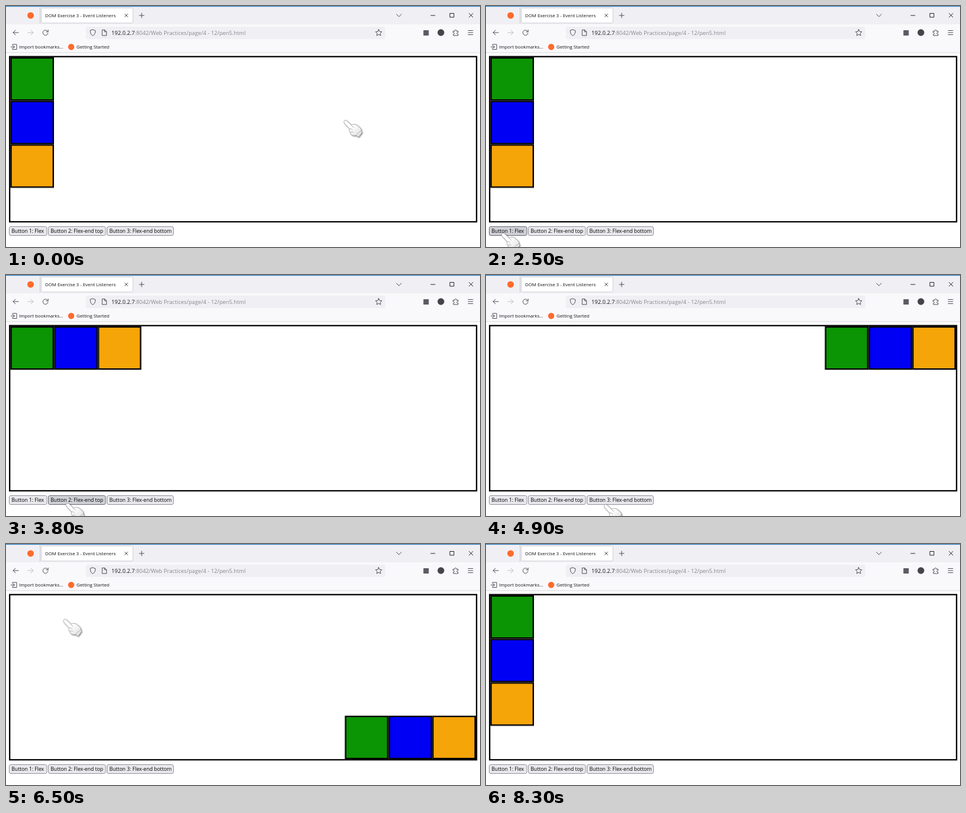
Animation of 800 by 408 pixels, one loop 8400 ms. Source, as an HTML page:

```html
<!DOCTYPE html>
<html lang="en">
<head>
<meta charset="utf-8">
<title>Event Listeners</title>
<style>
html, body { margin: 0; width: 100%; height: 100%; overflow: hidden; background: #fff; }
svg { display: block; width: 800px; height: 408px; }
text { font: 7.85px "Open Sans", "Noto Sans", sans-serif; fill: #15141a; white-space: pre; }
.url { font-size: 9.3px; fill: #85858d; }
.url .host { fill: #15141a; }
.button text { font-size: 8.6px; fill: #000; }
.button rect { fill: #e9e9ed; stroke: #8f8f9d; }
.icon { fill: none; stroke: #4c4b54; stroke-width: 1; stroke-linecap: round; stroke-linejoin: round; }

.box, .button rect, .reload, .burst, .cursor { animation: 8.4s infinite step-end; }

.box { --step: calc(var(--i) * 73.7px); stroke: #000; stroke-width: 2.4; animation-name: layout; }
@keyframes layout {
  0%, 82.1% { transform: translate(0, var(--step)); }
  34.5% { transform: translate(var(--step), 0); }
  49.4% { transform: translate(calc(564.6px + var(--step)), 0); }
  65.4% { transform: translate(calc(564.6px + var(--step)), 204px); }
  100% { transform: translate(0, var(--step)); }
}

.b1 rect { animation-name: hover1; }
.b2 rect { animation-name: hover2; }
.b3 rect { animation-name: hover3; }
@keyframes hover1 { 27%  { fill: #d0d0d7; stroke: #676774; } 40.5% { fill: #e9e9ed; stroke: #8f8f9d; } }
@keyframes hover2 { 43%  { fill: #d0d0d7; stroke: #676774; } 52.5% { fill: #e9e9ed; stroke: #8f8f9d; } }
@keyframes hover3 { 61%  { fill: #d0d0d7; stroke: #676774; } 73.2% { fill: #e9e9ed; stroke: #8f8f9d; } }

.reload { opacity: 0; animation-name: reload; }
@keyframes reload { 79% { opacity: 1; } 88% { opacity: 0; } }

.burst { opacity: 0; transform: scale(0); animation-name: burst; }
@keyframes burst {
  0% { opacity: 0; transform: scale(0); }
  82.1% { opacity: .42; transform: scale(0); animation-timing-function: linear; }
  86.6%, 100% { opacity: 0; transform: scale(124); }
}

.cursor { animation-name: move; animation-timing-function: ease-in-out; }
@keyframes move {
  0%, 10.7% { transform: translate(570px, 193px); }
  27.4%, 39.3% { transform: translate(26px, 384px); }
  44%, 51.8% { transform: translate(101px, 386px); }
  57.7%, 60.1% { transform: translate(199px, 388px); }
  61.9%, 72.6% { transform: translate(204px, 387px); }
  79.8%, 86.9% { transform: translate(64px, 48px); opacity: 1; }
  94% { transform: translate(497px, 150px); opacity: 1; animation-timing-function: step-end; }
  95.2%, 100% { transform: translate(497px, 150px); opacity: 0; }
}
.hand { filter: drop-shadow(1px 1px 1px rgba(0, 0, 0, .5)); }
</style>
</head>
<body>
<svg viewBox="0 0 800 408">
  <defs>
    <clipPath id="tab"><rect x="60" y="3.5" width="154" height="25" rx="2.5"/></clipPath>
    <linearGradient id="glove" x1="0" y1="0" x2="1" y2="1">
      <stop offset=".4" stop-color="#fff"/><stop offset="1" stop-color="#dcdcdc"/>
    </linearGradient>
  </defs>

  <!-- tab strip -->
  <rect width="800" height="31" fill="#f0f0f4"/>
  <rect width="800" height="1.2" fill="#2d7fc1"/>
  <path d="M57.5 1V30" stroke="#c9c9d0"/>
  <circle cx="41.5" cy="16" r="5.5" fill="#ff6a2b"/>
  <rect x="59.7" y="3.2" width="154.6" height="25.6" rx="2.5" fill="#fff" stroke="#c4c4ca" stroke-width=".8"/>
  <g clip-path="url(#tab)"><g transform="translate(66 16)"><circle class="burst" r="1" fill="#0a78f0"/></g></g>
  <text x="66" y="19">DOM Exercise 3 - Event Listeners</text>
  <g class="icon">
    <path d="M200.5 13.5l5 5m0-5l-5 5M225 16h8m-4-4v8M659 14l4.2 4 4.2-4"/>
    <path d="M717 16h7M749.5 12.5h6.5v6.5h-6.5zM781.5 12.5l6.5 6.5m0-6.5l-6.5 6.5" stroke="#222"/>
  </g>

  <!-- toolbar -->
  <rect y="31" width="800" height="48" fill="#f9f9fb"/>
  <path d="M0 79H800" stroke="#d0d0d5" stroke-width=".8"/>
  <rect x="135" y="35" width="505" height="21" rx="2.5" fill="#f0f0f4"/>
  <rect class="reload" x="56" y="34.5" width="22" height="21.5" rx="2.5" fill="#d7d7dd"/>
  <g class="icon">
    <path d="M21 45H12m4-4l-4 4 4 4"/>
    <path d="M37 45h9m-4-4l4 4-4 4" stroke="#bcbcc4"/>
    <path d="M70.6 43.2A4.4 4.4 0 1 0 71 46M71.2 40.5v3.3h-3.3"/>
    <path d="M146.5 40l4.4 1.7c0 4-1 6.8-4.4 8.6-3.4-1.8-4.4-4.6-4.4-8.6z"/>
    <path d="M162.7 40.5h4l3 3v6.5h-7zM166.5 40.5v3.2h3.2"/>
    <path d="M629 39.8l1.6 3.4 3.7.5-2.7 2.6.7 3.7-3.3-1.8-3.3 1.8.7-3.7-2.7-2.6 3.7-.5z"/>
    <path d="M755 42.5h2.7c-.8-3 3.2-3 2.4 0h2.9v2.5c-3-.7-3 3 0 2.5v2.5h-8v-2.4c2.6.5 2.6-3.2 0-2.5z"/>
    <path d="M780 41.5h8M780 45h8M780 48.5h8"/>
    <path d="M11 67v-2h7v8.500h-7v-2M8.500 69.300h6m-2-2l2 2-2 2"/>
  </g>
  <rect x="704.5" y="41" width="9" height="9" fill="#5b5b66"/>
  <circle cx="734" cy="45" r="5.7" fill="#45444a"/>
  <text class="url" x="178" y="48.800"><tspan class="host">192.0.2.7</tspan>:8042/Web Practices/page/4 - 12/pen5.html</text>
  <text x="22" y="72">Import bookmarks...</text>
  <circle cx="110" cy="69.300" r="5.200" fill="#ff6a2b"/>
  <text x="119" y="72">Getting Started</text>

  <!-- page -->
  <rect x="6.200" y="85.700" width="788" height="279.600" fill="#fff" stroke="#000" stroke-width="2.300"/>
  <g>
    <rect class="box" style="--i:0" x="8.500" y="87.900" width="71.300" height="71.300" fill="#0b9404"/>
    <rect class="box" style="--i:1" x="8.500" y="87.900" width="71.300" height="71.300" fill="#0000f5"/>
    <rect class="box" style="--i:2" x="8.500" y="87.900" width="71.300" height="71.300" fill="#f6a509"/>
  </g>
  <g class="button b1"><rect x="5.500" y="373.500" width="63.500" height="15" rx="2.500"/><text x="9.300" y="384.200">Button 1: Flex</text></g>
  <g class="button b2"><rect x="71.500" y="373.500" width="96.500" height="15" rx="2.500"/><text x="75.300" y="384.200">Button 2: Flex-end top</text></g>
  <g class="button b3"><rect x="170.500" y="373.500" width="112" height="15" rx="2.500"/><text x="174.500" y="384.200">Button 3: Flex-end bottom</text></g>

  <g class="cursor">
    <g class="hand" stroke="#a2a2a2" stroke-width=".8" stroke-linejoin="round">
      <path fill="url(#glove)" d="M1 1Q3-1 6 2L13 9C16 6 21 7 25 11 28 13 30 16 29.500 18.500L31 21 25 29 20.500 26C15 27 12 25 11.500 21.500 9 19.500 9 17 10 15L2 6.500Q-1 3 1 1Z"/>
      <path fill="none" d="M13 9l4 4M10 15q3-1 5 2M11.500 21q3-2 5 0M29.500 18.500q-5 2-9 7.500"/>
    </g>
  </g>
</svg>
</body>
</html>
```
